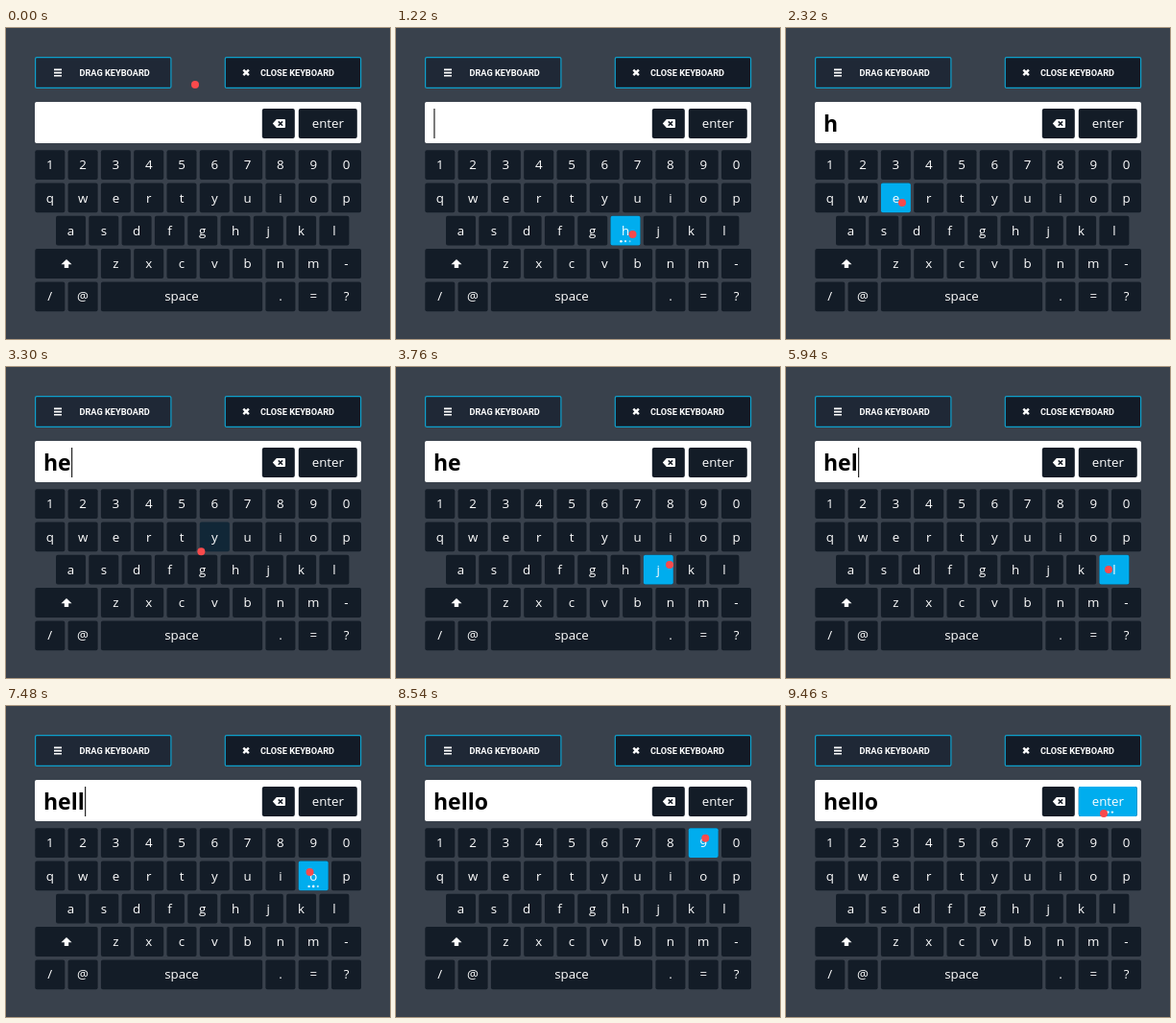
Write an HTML page that moves like this. It is 400 by 324 pixels and loops after 9500 ms.

```html
<!DOCTYPE html>
<html lang="en">
<head>
<meta charset="utf-8">
<title>Dwell keyboard</title>
<style>
html, body { margin: 0; width: 100%; height: 100%; overflow: hidden; background: #39414c; }
svg { display: block; width: 400px; height: 324px; }
text { font-family: "Open Sans", "Noto Sans", sans-serif; fill: #fff; }
.key text { font-size: 13.3px; text-anchor: middle; }
.base { fill: #131c27; }
.lit { fill: #00adee; opacity: 0; }
.btn rect { stroke: #0fa0cb; stroke-width: 1.2; }
.btn text { font: 700 9.2px Roboto, Arial, sans-serif; }
.icon { fill: #fff; }
.cross { stroke: #fff; stroke-width: 2.4; }
#typed { font-size: 23px; font-weight: 700; fill: #000; }
</style>
</head>
<body>
<svg viewBox="0 0 400 324">
  <rect width="400" height="324" fill="#39414c"/>
  <g class="btn">
    <rect x="30.6" y="30.6" width="141.3" height="31.8" rx="1.5" fill="#1f2836"/>
    <path class="icon" d="M50 42.5h8v1.7h-8zM50 45.7h8v1.7h-8zM50 48.9h8v1.7h-8z"/>
    <text x="76.5" y="50">DRAG KEYBOARD</text>
    <rect x="228.3" y="30.6" width="141.3" height="31.8" rx="1.5" fill="#131b27"/>
    <path class="cross" d="M247.3 43.6l5.6 5.6m0-5.6l-5.6 5.6"/>
    <text x="265" y="50">CLOSE KEYBOARD</text>
  </g>
  <rect x="30" y="77" width="340" height="43" rx="2" fill="#fff"/>
  <text id="typed" x="39" y="108"></text>
  <rect id="caret" y="84" width="1.1" height="31" fill="#111"/>
  <g id="keys"></g>
  <path class="icon" d="M277.8 99.6l4-4.5h8.2q1 0 1 1v7q0 1-1 1h-8.2z"/>
  <path d="M283.7 97.4l4.4 4.4m0-4.4l-4.4 4.4" stroke="#131c27" stroke-width="1.5"/>
  <path class="icon" d="M63 241l5.5 5.3h-3.3v3.6h-4.4v-3.6h-3.3z"/>
  <g id="dots"></g>
  <circle id="gaze" r="4" fill="#f94a4c"/>
</svg>
<script>
const LOOP = 9500, FADE = 120, PITCH = 34.3;
const $ = id => document.getElementById(id);
const keys = [];

function make(tag, attrs, parent) {
  const el = document.createElementNS("http://www.w3.org/2000/svg", tag);
  for (const name in attrs) el.setAttribute(name, attrs[name]);
  return parent.appendChild(el);
}

function addKey(label, x, y, w = 31, h = 30.8) {
  const g = make("g", { class: "key" }, $("keys"));
  const box = { x, y, width: w, height: h, rx: 2 };
  make("rect", { ...box, class: "base" }, g);
  const lit = make("rect", { ...box, class: "lit" }, g);
  make("text", { x: x + w / 2, y: y + h / 2 + 4.6 }, g).textContent = label;
  keys.push({ label, x, y, w, h, lit });
}

const col = i => 30.3 + i * PITCH;
const row = i => 127.2 + i * PITCH;
function addRow(chars, x, r) {
  [...chars].forEach((c, i) => addKey(c, x + i * PITCH, row(r)));
}

addKey("", 266.8, 84, 34, 31);
addKey("enter", 304.8, 84, 61, 31);
addRow("1234567890", col(0), 0);
addRow("qwertyuiop", col(0), 1);
addRow("asdfghjkl", 52, 2);
addKey("", col(0), row(3), 65.3);
addRow("zxcvbnm-", col(2), 3);
addRow("/@", col(0), 4);
addKey("space", col(2), row(4), 168.2);
addRow(".=?", col(7), 4);

// Gaze path: time, x, y
const path = [
  [0, 197, 59], [350, 208, 108], [900, 243, 207], [1220, 246.5, 215],
  [1780, 242, 213], [2240, 119, 179], [2320, 121, 182], [3050, 113, 177],
  [3500, 268, 203], [3760, 285, 206], [4020, 337, 210], [4900, 341, 212],
  [5250, 376, 215], [5640, 348, 212], [5940, 336, 211], [6460, 340, 210],
  [7130, 322, 179], [7480, 316.5, 173], [7940, 319, 177], [8450, 322, 140],
  [9000, 326, 107], [9460, 331, 112], [9500, 331, 112]
];

// Dwell on a key: label, start, end, letter typed at the end
const dwells = [
  ["h", 1150, 1780, "h"], ["e", 2450, 3050, "e"], ["l", 4270, 4900, "l"],
  ["l", 5960, 6460, "l"], ["o", 7320, 7940, "o"], ["enter", 9230, LOOP, ""]
];
const advance = { h: 15.1, e: 13.6, l: 7, o: 14.2 };

function gazeAt(t) {
  if (t <= 0) return path[0].slice(1);
  const i = path.findIndex(p => p[0] > t);
  const [t0, x0, y0] = path[i - 1], [t1, x1, y1] = path[i];
  const u = (t - t0) / (t1 - t0), k = u * u * (3 - 2 * u);
  return [x0 + (x1 - x0) * k, y0 + (y1 - y0) * k];
}

const inside = (k, [x, y]) => x >= k.x && x <= k.x + k.w && y >= k.y && y <= k.y + k.h;

// Highlight fades in while the gaze stays, and drops at once when it leaves
function glow(key, t) {
  const steps = 12;
  let n = 0;
  while (n < steps && inside(key, gazeAt(t - n * FADE / steps))) n++;
  return n / steps;
}

const dots = [0, 1, 2].map(() => make("circle", { fill: "#fff" }, $("dots")));

function drawDots(t) {
  const dwell = dwells.find(d => t >= d[1] && t < d[2]);
  $("dots").style.display = dwell ? "" : "none";
  if (!dwell) return;
  const key = keys.find(k => k.label === dwell[0]);
  dots.forEach((dot, i) => {
    const pulse = 0.5 + 0.5 * Math.cos((t - dwell[1] - 70) / 95 - i * 1.3);
    dot.setAttribute("cx", key.x + key.w / 2 + (i - 1) * 4.6);
    dot.setAttribute("cy", key.y + key.h - 4.4);
    dot.setAttribute("r", 0.9 + 0.4 * pulse);
    dot.setAttribute("opacity", 0.5 + 0.45 * pulse);
  });
}

function drawText(t) {
  const done = dwells.filter(d => t >= d[2]);
  const text = done.map(d => d[3]).join("");
  const since = t - (done.length ? done[done.length - 1][2] : 100);
  const width = [...text].reduce((sum, c) => sum + advance[c], 0);
  $("typed").textContent = text;
  $("caret").setAttribute("x", 39.4 + width);
  $("caret").style.display = since >= 0 && since % 1000 < 500 ? "" : "none";
}

function draw(now) {
  const t = now % LOOP, [x, y] = gazeAt(t);
  for (const key of keys) key.lit.style.opacity = glow(key, t);
  drawDots(t);
  drawText(t);
  $("gaze").setAttribute("cx", x);
  $("gaze").setAttribute("cy", y);
}

let start;
function tick(now) {
  start ??= now;
  draw(now - start);
  requestAnimationFrame(tick);
}
draw(0);
requestAnimationFrame(tick);
</script>
</body>
</html>
```
